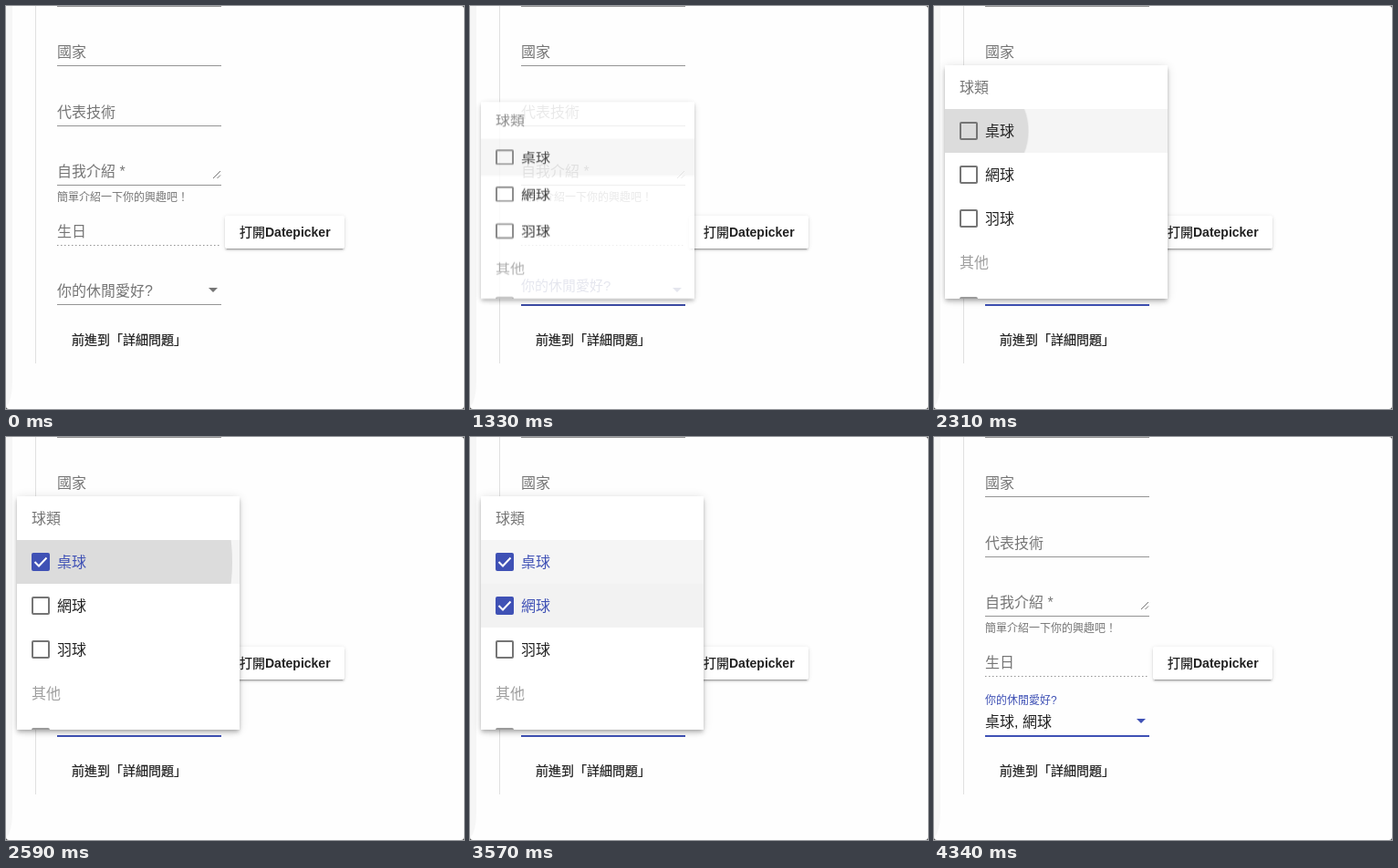
An HTML page that plays this animation: 502x442 px, repeating every 5.32 s.

```html
<!DOCTYPE html>
<html lang="zh-Hant">
<head>
<meta charset="utf-8">
<title>Multiple select</title>
<style>
  html, body { margin: 0; width: 100%; height: 100%; overflow: hidden; background: #fefefe; }
  body { position: relative; }
  svg, .raised, #panel { position: absolute; }
  svg { display: block; left: 0; top: 0; }
  text { font-family: "Liberation Sans", "Noto Sans CJK TC", "Noto Sans CJK", sans-serif; fill: #212121; white-space: pre; }
  .hint { fill: #757575; }
  .off { fill: #9e9e9e; }
  .btn { font-weight: 500; stroke: #212121; stroke-width: .25px; }
  .btn .latin { font-weight: 700; stroke: none; }
  .line { fill: #949494; }
  .box { fill: none; stroke: #757575; stroke-width: 2; }
  .tick { fill: none; stroke: #fff; stroke-width: 2; }
  .ripple { transform-box: fill-box; transform-origin: center; fill-opacity: .1; }
  .raised {
    left: 240px; top: 230px; width: 131px; height: 36px; border-radius: 2px; background: #fff;
    box-shadow: 0 3px 1px -2px rgba(0,0,0,.2), 0 2px 2px rgba(0,0,0,.14), 0 1px 5px rgba(0,0,0,.12);
  }
  #panel {
    left: 12px; top: 65px; width: 244px; height: 256px; overflow: hidden; opacity: 0;
    background: #fff; transform-origin: 50% 100%;
    box-shadow: 0 2px 4px -1px rgba(0,0,0,.2), 0 4px 5px rgba(0,0,0,.14), 0 1px 10px rgba(0,0,0,.12);
  }
</style>
</head>
<body>
<svg id="form" width="502" height="442">
  <path d="M0 0H7V412Q7 432 0 440Z" fill="#f6f6f6"/>
  <rect x="32" width="1" height="392" fill="#e0e0e0"/>
  <path d="M227 189L235 181M231.5 189L235 185.5" stroke="#777" fill="none"/>
  <path d="M56 262.5H236" stroke="#949494" stroke-dasharray="1.5 2.5"/>
  <rect id="hover" x="56" y="348" width="158" height="36" rx="2" fill="#000" opacity="0"/>
  <path id="arrow" d="M222 309H232L227 314Z" fill="#757575"/>
  <path d="M0 439Q0 442 3 442H0ZM502 439Q502 442 499 442H502ZM499 0Q502 0 502 3V0Z" fill="#444"/>
</svg>
<div class="raised"></div>
<svg id="front" width="502" height="442" style="pointer-events:none"></svg>
<div id="panel"><svg id="list" width="244" height="256"></svg></div>

<script>
const LOOP = 5320, TICK = 70;
const BLUE = '#3f51b5', GREY = '#757575', INK = '#212121';
const SWIFT = 'cubic-bezier(.25,.8,.25,1)', DECEL = 'cubic-bezier(0,0,.2,1)';
const $ = id => document.getElementById(id);

function add(parent, tag, attrs = {}, text = '') {
  const el = document.createElementNS('http://www.w3.org/2000/svg', tag);
  for (const k in attrs) el.setAttribute(k, attrs[k]);
  el.textContent = text;
  return parent.appendChild(el);
}

// Text placed by its left edge and vertical middle.
const label = (parent, x, mid, size, text, cls = '') =>
  add(parent, 'text', { x, y: mid + size * .37, 'font-size': size, class: cls }, text);

// steps: [time, value, easing towards the next step]
function play(el, prop, steps) {
  const all = [[0, steps[0][1]], ...steps, [LOOP, steps[steps.length - 1][1]]];
  el.animate(
    all.map(([t, v, easing = 'linear']) => ({ offset: t / LOOP, [prop]: v, easing })),
    { duration: LOOP, iterations: Infinity, easing: `steps(${LOOP / TICK})` }
  );
}
const change = (el, prop, t, from, to, ms = 0, easing) =>
  play(el, prop, [[t, from, easing], [t + ms, to]]);

// Form
const form = $('form');
for (const y of [0, 65, 131, 196, 327])
  add(form, 'rect', { x: 56, y, width: 180, height: 1, class: 'line' });
label(form, 56, 50, 16, '國家', 'hint');
label(form, 56, 116, 16, '代表技術', 'hint');
label(form, 56, 181, 16, '自我介紹 *', 'hint');
label(form, 56, 210, 12, '簡單介紹一下你的興趣吧！', 'hint');
label(form, 56, 247, 16, '生日', 'hint');
label(form, 72, 366, 14, '前進到「詳細問題」', 'btn');
const open = label($('front'), 256, 248, 14, '打開', 'btn');
add(open, 'tspan', { class: 'latin' }, 'Datepicker');

// Select field
const title = add(form, 'text', { 'font-size': 16, class: 'hint' }, '你的休閒愛好?');
change(title, 'transform', 1300, 'translate(56px,318px) scale(1)', 'translate(56px,293.4px) scale(.75)', 400, SWIFT);
change(title, 'fill', 1300, GREY, BLUE, 60);
change($('arrow'), 'fill', 1300, GREY, BLUE, 60);
const value = label(form, 56, 312, 16, '桌球, 網球');
change(value, 'opacity', 2400, 0, 1);
const bar = add(form, 'rect', { x: 56, y: 327, width: 180, height: 2 });
change(bar, 'opacity', 740, 0, 1, 600, SWIFT);
change(bar, 'fill', 1277, INK, BLUE, 60);
play($('hover'), 'opacity', [[3780, 0], [3910, .12], [4140, .12], [4340, 0]]);

// Panel
const panel = $('panel'), list = $('list');
play(panel, 'opacity', [[1277, 0, SWIFT], [1427, 1], [3803, 1], [4053, 0]]);
change(panel, 'transform', 1277, 'scaleY(0)', 'scaleY(1)', 150, SWIFT);
change(panel, 'width', 1277, '180px', '244px', 150, SWIFT);

function option(i, text, opts = {}) {
  const row = add(list, 'svg', { y: i * 48, width: 244, height: 48 });
  const { active, press, pick } = opts;
  if (press) {
    const bg = add(row, 'rect', { width: 244, height: 48, fill: '#f5f5f5' });
    if (active) change(bg, 'opacity', active, 0, 1);
    const wave = add(row, 'circle', { cx: 26, cy: 24, r: 220, class: 'ripple' });
    change(wave, 'transform', press, 'scale(0)', 'scale(1)', 450, DECEL);
    change(wave, 'opacity', press + 450, 1, 0, 400, DECEL);
  }
  const box = add(row, 'rect', { x: 17, y: 15, width: 18, height: 18, rx: 1, class: 'box' });
  const name = label(row, 44, 24, 16, text);
  if (pick) {
    const mark = add(row, 'g');
    add(mark, 'rect', { x: 16, y: 14, width: 20, height: 20, rx: 2, fill: BLUE });
    add(mark, 'path', { d: 'M19.5 24L24 28.5L32.5 19.5', class: 'tick' });
    change(mark, 'opacity', pick, 0, 1, 90);
    change(box, 'opacity', pick, 1, 0, 90);
    change(name, 'fill', pick, INK, BLUE);
  }
  return box;
}

label(list, 16, 24, 16, '球類', 'hint');
option(1, '桌球', { press: 2266, pick: 2390 });
option(2, '網球', { active: 2870, press: 2903, pick: 3025 });
option(3, '羽球');
label(list, 16, 216, 16, '其他', 'off');
option(5, '').style.stroke = '#9a9a9a';
</script>
</body>
</html>
```
